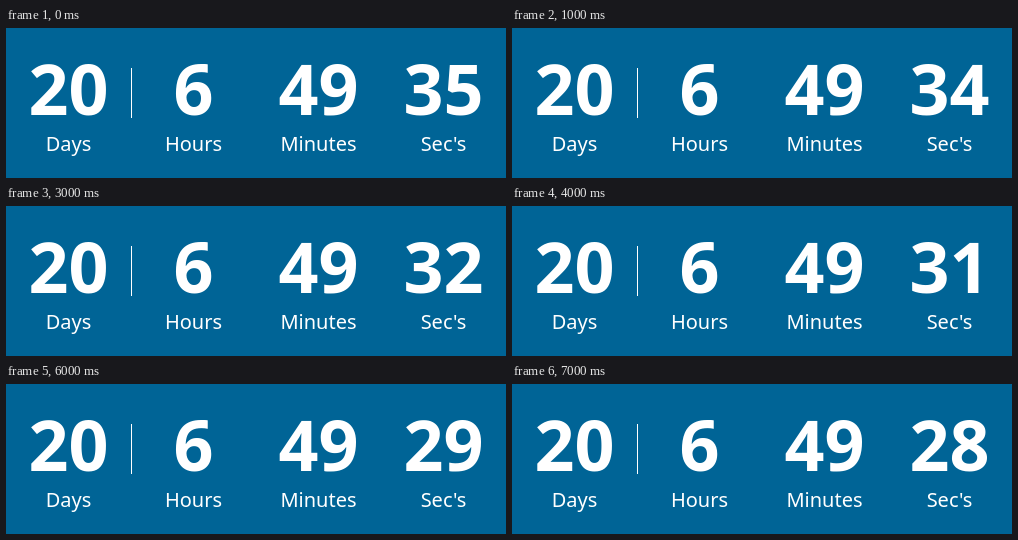
Write an HTML page that moves like this. It is 500 px wide and 150 px high and loops after 8 s.

```html
<!DOCTYPE html>
<html lang="en">
<head>
<meta charset="utf-8">
<title>Countdown</title>
<style>
  html, body { margin: 0; height: 100%; overflow: hidden; background: #006496; }
  svg { display: block; }
  text { font-family: "Noto Sans", sans-serif; fill: #fff; text-anchor: middle; }
  .value { font-size: 70px; font-weight: 700; }
  .label { font-size: 20px; }
</style>
</head>
<body>
<svg id="clock" width="500" height="150">
  <rect x="125" y="40" width="1" height="50" fill="#fff"/>
</svg>
<script>
  const START = 35, STEPS = 8;
  const clock = document.getElementById("clock");

  function addText(className, x, y, content) {
    const node = document.createElementNS("http://www.w3.org/2000/svg", "text");
    node.setAttribute("class", className);
    node.setAttribute("x", x);
    node.setAttribute("y", y);
    node.textContent = content;
    clock.append(node);
    return node;
  }

  const columns = [["Days", 20], ["Hours", 6], ["Minutes", 49], ["Sec's", START]];
  const values = columns.map(([label, value], i) => {
    const x = 62.5 + 125 * i;
    addText("label", x, 123, label);
    return addText("value", x, 87, value);
  });
  const seconds = values[3];

  function draw() {
    seconds.textContent = START - Math.floor(performance.now() / 1000) % STEPS;
    requestAnimationFrame(draw);
  }
  draw();
</script>
</body>
</html>
```
